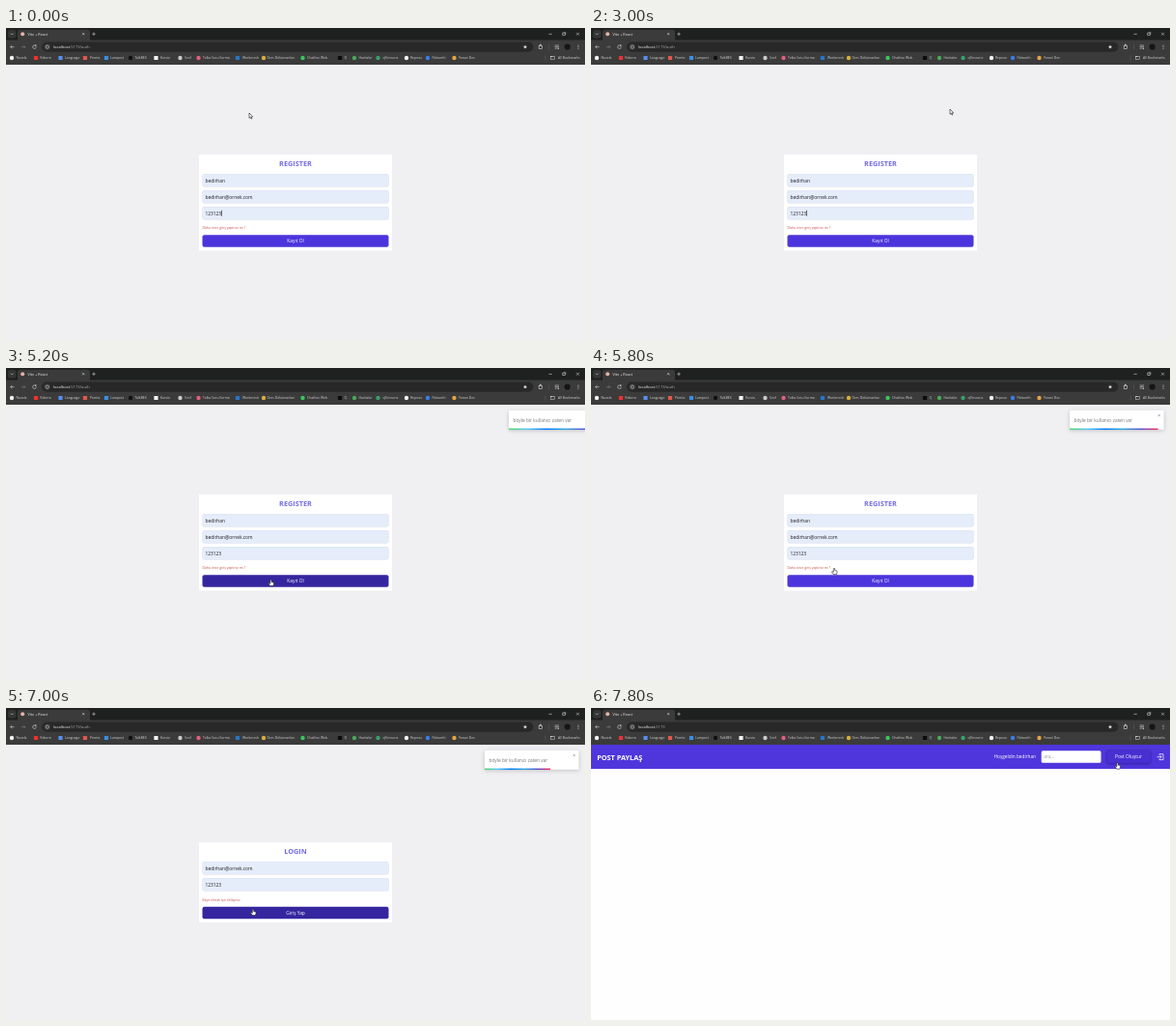
An HTML page with a canvas for the animation above (8 s loop, 600 by 323 pixels).

```html
<!DOCTYPE html>
<html lang="tr">
<head>
<meta charset="utf-8">
<title>Register and login</title>
<style>
  html, body { margin: 0; width: 100%; height: 100%; overflow: hidden; background: #f0eff2; }
  canvas { display: block; width: 600px; height: 323px; }
</style>
</head>
<body>
<canvas id="stage"></canvas>
<script>
const W = 600, H = 323, LOOP = 8000, STEP = 200;
const FONT = '"Open Sans", "Noto Sans", sans-serif';
const USER = 'bedirhan', MAIL = USER + '@ornek.com', PASS = '123123';
const LOGIN_AT = 6200, HOME_AT = 7200;

const canvas = document.getElementById('stage');
const ctx = canvas.getContext('2d');
const dpr = window.devicePixelRatio || 1;
canvas.width = W * dpr;
canvas.height = H * dpr;

// time, x, y of the pointer tip
const PATH = [
  [0, 252, 88], [400, 252, 88], [600, 290, 100], [800, 350, 116], [1000, 425, 136],
  [1200, 467, 146], [1800, 467, 146], [2000, 442, 126], [2200, 423, 108],
  [2600, 423, 108], [2800, 400, 96], [3000, 372, 84], [3400, 372, 84],
  [3600, 338, 69], [4000, 338, 69], [4200, 332, 92], [4400, 312, 140],
  [4600, 289, 190], [4800, 276, 217], [5000, 274.5, 219], [5400, 274.5, 219],
  [5600, 266, 213], [5800, 252, 207], [6000, 248, 205], [6200, 248, 201],
  [6400, 248, 200], [6600, 250, 203], [6800, 254, 207], [7000, 256, 208],
  [7200, 264, 172], [7400, 264, 172], [7600, 420, 108], [7800, 545.5, 56.5]
];

// icon x, text x, label, icon colour, square icon
const BOOKMARKS = [
  [6, 10.5, 'Nuvela', '#f2f2f2'], [31, 35, 'Vidorra', '#f03030', 1],
  [56.5, 61, 'Language', '#5b8def', 1], [82, 87, 'Pomta', '#e2574c', 1],
  [104, 108, 'Lumpost', '#3c8fe0', 1], [129, 133.5, 'TalkBEX', '#111111'],
  [155.5, 160, 'Kurvio', '#f4f4f4', 1], [180.5, 185, 'Sınıf', '#c9c9c9'],
  [199.5, 204, 'Tolka Soru Sorma', '#e0607c'], [240, 245, 'Workmesh', '#2676c8', 1],
  [267, 270.5, 'Ders Dökümanları', '#d8b13a'], [307.5, 312, 'Chatlino Web', '#35c95c'],
  [346, 350.5, 'Q', '#0c0c0c', 1], [361, 365.5, 'Haritalar', '#4aa85b'],
  [385.5, 390.5, 'q5lessons', '#38a169'], [415, 419, 'Repnox', '#f4f4f4'],
  [437, 441.5, 'Palworth', '#3b7de8'], [464.5, 469, 'Yorani Dev', '#e3a544']
];

function rect(x, y, w, h, fill, r = 0) {
  ctx.fillStyle = fill;
  ctx.beginPath();
  ctx.roundRect(x, y, w, h, r);
  ctx.fill();
}

function disc(x, y, r, fill) {
  ctx.fillStyle = fill;
  ctx.beginPath();
  ctx.arc(x, y, r, 0, Math.PI * 2);
  ctx.fill();
}

function line(points, color, width = 0.6) {
  ctx.strokeStyle = color;
  ctx.lineWidth = width;
  ctx.beginPath();
  points.forEach(([x, y], i) => i ? ctx.lineTo(x, y) : ctx.moveTo(x, y));
  ctx.stroke();
}

function ring(x, y, r, color, from = 0, to = Math.PI * 2) {
  ctx.strokeStyle = color;
  ctx.lineWidth = 0.6;
  ctx.beginPath();
  ctx.arc(x, y, r, from, to);
  ctx.stroke();
}

function cross(x, y, r, color) {
  line([[x - r, y - r], [x + r, y + r]], color);
  line([[x + r, y - r], [x - r, y + r]], color);
}

function text(str, x, y, size, color, align = 'left', weight = 400) {
  ctx.font = `${weight} ${size}px ${FONT}`;
  ctx.fillStyle = color;
  ctx.textAlign = align;
  ctx.textBaseline = 'alphabetic';
  ctx.fillText(str, x, y + size * 0.36);
  return ctx.measureText(str).width;
}

function shadow(color, blur, dy) {
  ctx.shadowColor = color;
  ctx.shadowBlur = blur * dpr;
  ctx.shadowOffsetY = dy * dpr;
}

function drawBrowser(path) {
  const ink = '#d6d6d6';
  rect(0, 0, W, 13, '#1f2020');
  rect(0, 12.5, W, 25.5, '#3b3b3b');

  rect(2, 2, 8.5, 8.5, '#343535', 2.5);
  line([[5, 5.6], [6.3, 7], [7.6, 5.6]], ink);
  rect(12, 1.8, 75, 13, '#3b3b3b', [3, 3, 0, 0]);
  disc(17.2, 6.3, 2, '#e3b3a5');
  text('Vite + React', 22.5, 6.4, 3.8, '#eeeeee');
  cross(80.2, 6.2, 1.1, ink);
  line([[89.3, 6.2], [92.7, 6.2]], ink);
  line([[91, 4.5], [91, 7.9]], ink);

  line([[562.5, 6.3], [565.8, 6.3]], ink);
  ctx.strokeRect(576.8, 5.1, 2.4, 2.4);
  line([[577.7, 4.4], [580, 4.4], [580, 6.8]], ink, 0.4);
  cross(592.5, 6.2, 1.4, ink);

  line([[8.5, 19.6], [4.7, 19.6]], ink);
  line([[6.3, 17.9], [4.6, 19.6], [6.3, 21.3]], ink);
  line([[16, 19.6], [19.8, 19.6]], '#808080');
  line([[18.2, 17.9], [19.9, 19.6], [18.2, 21.3]], '#808080');
  ring(29.5, 19.6, 1.8, ink, 0, 5.2);
  rect(30, 17.6, 1.4, 1.2, ink);

  rect(37, 14.5, 509.5, 10.2, '#282828', 5.1);
  disc(42.8, 19.6, 3.3, '#3b3b3b');
  ring(42.8, 19.6, 1.6, ink);
  const w = text('localhost', 49, 19.7, 4.1, '#f0f0f0');
  text(':5173' + path, 49 + w, 19.7, 4.1, '#a9a9a9');

  ctx.fillStyle = ink;
  ctx.beginPath();
  for (let i = 0; i < 10; i++) {
    const a = i * Math.PI / 5 - Math.PI / 2, r = i % 2 ? 1 : 2.2;
    ctx.lineTo(538 + r * Math.cos(a), 19.6 + r * Math.sin(a));
  }
  ctx.fill();
  ctx.strokeStyle = ink;
  ctx.lineWidth = 0.6;
  ctx.strokeRect(552.2, 18.2, 3.2, 3.2);
  rect(553.1, 16.8, 1.4, 1.4, ink);
  rect(562, 17, 0.4, 5.2, '#6a6a6a');
  [18, 19.6, 21.2].forEach((y, i) => line([[568.7, y], [i < 2 ? 573 : 570.7, y]], ink));
  disc(572.3, 21.2, 0.8, ink);
  disc(581.7, 19.6, 3.1, '#151515');
  [17.9, 19.6, 21.3].forEach(y => disc(593, y, 0.5, ink));

  for (const [ix, tx, label, color, square] of BOOKMARKS) {
    if (square) rect(ix - 2.1, 28.9, 4.2, 4.2, color, 0.5);
    else disc(ix, 31, 2.2, color);
    text(label, tx, 31.1, 3.4, '#d2d2d2');
  }
  rect(558.8, 28.5, 0.4, 5, '#6a6a6a');
  ctx.strokeStyle = ink;
  ctx.lineWidth = 0.5;
  ctx.strokeRect(564.4, 29.6, 4.2, 3.1);
  rect(564.4, 29, 2, 0.8, ink);
  text('All Bookmarks', 572, 31.1, 3.45, '#d2d2d2');
}

function drawField(y, value) {
  rect(203.5, y, 193, 13.6, '#d3daea', 2);
  rect(203.9, y + 0.4, 192.2, 12.8, '#e5ecfa', 1.7);
  return text(value, 206.5, y + 6.9, 4.85, '#1d1d22');
}

function drawForm(top, height, title, values, link, action, hover, caret) {
  rect(200, top, 200, height, '#ffffff');
  text(title, 300, top + 9.2, 7.3, '#736be6', 'center', 700);
  values.forEach((value, i) => {
    const y = top + 19.9 + i * 17, w = drawField(y, value);
    if (caret && i === values.length - 1) rect(206.7 + w, y + 3.9, 0.6, 6, '#111111');
  });
  const end = top + height;
  text(link, 203.5, end - 23.3, 3.4, '#c94a47');
  rect(203.5, end - 16.3, 193, 12.6, hover ? '#35269f' : '#4c35dc', 2);
  text(action, 300, end - 9.9, 4.85, '#ffffff', 'center');
}

function toastShift(t) {
  if (t < 5400) return 25;
  return t < 5600 ? 2.5 : 0;
}

function drawToast(t) {
  const x = 496 + toastShift(t), w = 97.6;
  ctx.save();
  shadow('rgba(0,0,0,0.2)', 4, 1);
  rect(x, 43.8, w, 20, '#ffffff', 1.3);
  ctx.restore();
  text('böyle bir kullanıcı zaten var', x + 4.5, 54, 4.8, '#757575');
  cross(x + 92.7, 49, 1.2, '#8d8d8d');

  const left = 1 - Math.max(0, t - 5490) / 5000;
  const grad = ctx.createLinearGradient(x, 0, x + w * left, 0);
  ['#4cd964', '#5ac8fa', '#007aff', '#34aadc', '#5856d6', '#ff2d55']
    .forEach((c, i) => grad.addColorStop(i / 5, c));
  rect(x, 62.4, w * left, 1.5, grad);
}

function drawHome(hover) {
  const violet = '#4e36dc';
  rect(0, 38, W, H - 38, '#fefefe');
  rect(0, 38, W, 25, violet);
  text('POST PAYLAŞ', 6.2, 51, 7.3, '#ffffff', 'left', 700);
  text('Hoşgeldin ' + USER, 461, 50.7, 4.75, '#ffffff', 'right');
  rect(466.7, 44.2, 61.8, 12.6, '#ffffff', 1.6);
  text('ara...', 469.3, 50.6, 4.7, '#9a9a9f');
  ctx.save();
  shadow('rgba(20,8,90,0.6)', hover ? 3 : 1, 0.5);
  rect(534.5, 44, 45.3, 13.3, hover ? '#472fd2' : violet, 1.8);
  ctx.restore();
  text('Post Oluştur', 557, 50.6, 4.85, '#ffffff', 'center');
  line([[589, 48.9], [589, 47.7], [593, 47.7], [593, 53.6], [589, 53.6], [589, 52.4]], '#ffffff', 0.7);
  line([[586.7, 50.6], [591.2, 50.6]], '#ffffff', 0.7);
  line([[589.6, 49.1], [591.2, 50.6], [589.6, 52.1]], '#ffffff', 0.7);
}

function pointerAt(t) {
  const i = PATH.findIndex(p => p[0] > t);
  if (i < 0) return PATH[PATH.length - 1].slice(1);
  const [t0, x0, y0] = PATH[i - 1], [t1, x1, y1] = PATH[i];
  const k = (t - t0) / (t1 - t0);
  return [x0 + (x1 - x0) * k, y0 + (y1 - y0) * k];
}

function drawPointer(x, y, hand) {
  ctx.save();
  ctx.transform(1, 0, 0, 1, x, y);
  const shape = new Path2D(hand
    ? 'M-.7 .7Q0-.4 .7 .7V2.6L2.6 3Q3.2 3.2 3.1 4L2.6 6.6H-.8L-2.4 4.3Q-2.4 3.3-1.6 3.7L-.7 4.4Z'
    : 'M0 0V5.3L1.2 4.2 2 6.1 2.9 5.7 2.1 3.9H3.7Z');
  ctx.lineWidth = 0.6;
  ctx.lineJoin = 'round';
  ctx.fillStyle = '#ffffff';
  ctx.strokeStyle = '#1a1a1a';
  ctx.fill(shape);
  ctx.stroke(shape);
  ctx.restore();
}

function draw(time) {
  const t = Math.floor(time / STEP) * STEP;
  const [x, y] = pointerAt(t);
  const inside = (x0, y0, x1, y1) => x >= x0 && x <= x1 && y >= y0 && y <= y1;
  let hand;

  ctx.setTransform(dpr, 0, 0, dpr, 0, 0);
  rect(0, 0, W, H, '#f0eff2');

  if (t >= HOME_AT) {
    hand = inside(534, 43, 580, 58);
    drawHome(hand);
  } else if (t >= LOGIN_AT) {
    const hover = inside(203, 205.5, 397, 219);
    hand = hover || inside(203, 194, 250, 204);
    drawForm(139, 83, 'LOGIN', [MAIL, PASS], 'Kayıt olmak için tıklayınız', 'Giriş Yap', hover);
  } else {
    const hover = inside(203, 214, 397, 227);
    const caret = t < 5000 && (t + 450) % 1060 < 530;
    hand = hover || inside(203, 203, 253, 211);
    drawForm(131, 99.5, 'REGISTER', [USER, MAIL, PASS],
      'Daha önce giriş yaptınız mı ?', 'Kayıt Ol', hover, caret);
  }

  if (t >= 5200 && t < HOME_AT) drawToast(t);
  drawBrowser(t >= HOME_AT ? '' : '/auth');
  drawPointer(x, y, hand);
}

const start = performance.now();
function tick() {
  draw((performance.now() - start) % LOOP);
  requestAnimationFrame(tick);
}
tick();
</script>
</body>
</html>
```
